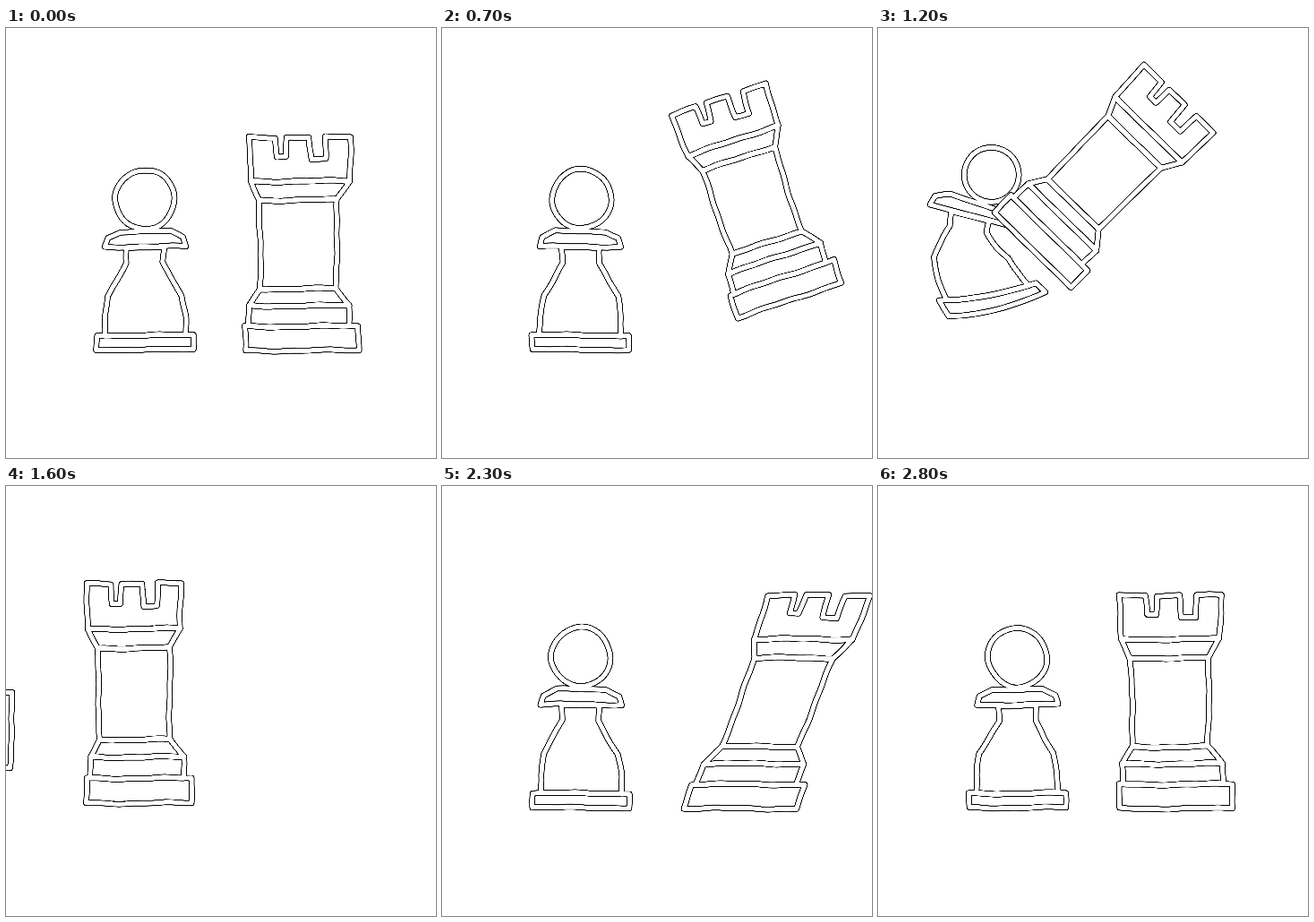
Recreate the animation shown at these times as an HTML page with a canvas. Size 480 by 480 pixels, loop 2.9 s.

```html
<!DOCTYPE html>
<html lang="en">
<head>
<meta charset="utf-8">
<title>Pawn and rook</title>
<style>
html, body { margin: 0; width: 100%; height: 100%; overflow: hidden; background: #fff; }
canvas { display: block; width: 480px; height: 480px; }
</style>
</head>
<body>
<canvas id="stage" width="480" height="480"></canvas>
<script>
const SIZE = 480, STEP = 100, COUNT = 29;
const ctx = document.getElementById('stage').getContext('2d', { willReadFrequently: true });

// Rook: origin at the middle of its foot, y points down.
const TOP = -238;
const notch = (left, right, depth) =>
  [[left, TOP], [left + 2, TOP + depth], [right - 1, TOP + depth], [right, TOP]];
const band = ([y0, l0, r0], [y1, l1, r1]) => [[l0, y0], [r0, y0], [r1, y1], [l1, y1]];
const rows = [[-189, -56, 54], [-168, -46, 41], [-69, -45, 39], [-50, -57, 55], [-27, -58, 54]];
const rookParts = [
  [[-58, TOP], ...notch(-29, -16, 21), ...notch(9, 28, 25), [56, TOP], [54, -189], [-56, -189]],
  ...rows.slice(1).map((row, i) => band(rows[i], row)),
  band([-27, -62, 64], [0, -62, 64])
];

// Pawn: mirrored halves, second value is the height above the foot.
const mirror = half => [...half, ...half.map(([x, h]) => [-x, h]).reverse()];
const pawnParts = [
  [[21, 114], [20.5, 97], [31, 77], [41.5, 60], [45, 36], [45.5, 16]],
  [[54, 0], [54, 16]],
  [[45, 115], [42, 125], [28, 132]]
].map(mirror);

// step, x, y, angle, skew, width, height
const rookDefaults = [0, 0, 0, 0, 0, .97, 1];
const rookKeys = [
  [0, 329, 360, 0, 0, 1],
  [3, 328, 336, -1, 0, .83, 1.02],
  [6, 350, 314, -11],
  [7, 387.5, 304, -19],
  [9, 412, 298, -25],
  [10, 380, 295, -10],
  [12, 172, 247, 44.5, 0, .95, .985],
  [13, 160, 260, 38],
  [16, 148, 354, 0, -.02, .93, 1.03],
  [18, 148, 356],
  [20, 150, 336, 0, -.29],
  [21, 215, 345, 0, -.1],
  [23, 331, 360, 0, .385, 1]
];

// step, x, y, angle, bend, scale
const pawnDefaults = [0, 0, 0, 0, 0, 1];
const pawnKeys = [
  [11, 155, 359],
  [12, 133, 308, 0, 1],
  [14, 62, 290, -45, .5, .88],
  [16, 6, 273, -88, 0, .78],
  [17, 155, 359]
];

function poseAt(keys, defaults, step) {
  const full = key => defaults.map((v, i) => key[i] ?? v);
  const next = keys.findIndex(k => k[0] >= step);
  if (next < 0) return full(keys[keys.length - 1]).slice(1);
  if (next === 0) return full(keys[0]).slice(1);
  const a = full(keys[next - 1]), b = full(keys[next]);
  const u = (step - a[0]) / (b[0] - a[0]);
  return a.map((v, i) => v + (b[i] - v) * u).slice(1);
}

function place(x, y, cx, cy, degrees) {
  const a = degrees * Math.PI / 180, c = Math.cos(a), s = Math.sin(a);
  return [cx + x * c - y * s, cy + x * s + y * c];
}

// Smooth hand wobble that redraws itself every step.
function wobble([x, y], step, size) {
  const seed = step * 2.4;
  return [
    x + size * (Math.sin(y * .06 + seed * 1.7) + .5 * Math.sin(y * .17 + x * .04 + seed)),
    y + size * (Math.sin(x * .055 + seed * 1.3) + .5 * Math.sin(x * .16 - y * .03 + seed * 2.1))
  ];
}

function outline(points, map) {
  const path = new Path2D();
  points.forEach(([x, y], i) => {
    const [nx, ny] = points[(i + 1) % points.length];
    const n = Math.max(1, Math.ceil(Math.hypot(nx - x, ny - y) / 8));
    for (let j = 0; j < n; j++) {
      path.lineTo(...map([x + (nx - x) * j / n, y + (ny - y) * j / n]));
    }
  });
  path.closePath();
  return path;
}

function strokeAll(paths, color, width) {
  ctx.strokeStyle = color;
  ctx.lineWidth = width;
  paths.forEach(p => ctx.stroke(p));
}

function drawPiece(paths) {
  ctx.fillStyle = '#fff';
  paths.forEach(p => ctx.fill(p));
  strokeAll(paths, '#000', 6.5);
  strokeAll(paths, '#fff', 5.1);
}

function pawn(step, size) {
  const [cx, cy, angle, bend, scale] = poseAt(pawnKeys, pawnDefaults, step);
  const warp = ([x, h]) => {
    const sag = 6 * (1 - (x / 55) ** 2) * Math.max(0, 1 - h / 60);
    const px = x + bend * (-.73 * h + .0041 * h * h);
    const py = -h * (1 - .14 * bend) + bend * (x * (-.25 + .0045 * h) + sag);
    return place(px * scale, py * scale, cx, cy, angle);
  };
  const map = p => warp(wobble(p, step, size));
  const [hx, hy] = warp([.5, 168]);
  const r = (33 - 2.5 * bend) * scale;
  const head = Array.from({ length: 40 }, (_, i) => {
    const a = i * Math.PI / 20;
    return [hx + r * Math.cos(a), hy + r * Math.sin(a)];
  });
  drawPiece([...pawnParts.map(p => outline(p, map)), outline(head, p => wobble(p, step, size))]);
}

function rook(step, size) {
  let [cx, cy, angle, skew, w, h] = poseAt(rookKeys, rookDefaults, step);
  const settle = step - 23;
  if (settle > 0) skew *= Math.exp(-.6 * settle) * Math.cos(.7 * settle);
  const map = p => {
    const [x, y] = wobble(p, step + 5, size);
    return place(x * w - skew * y, y * h, cx, cy, angle);
  };
  drawPiece(rookParts.map(p => outline(p, map)));
}

// Hardens the thin edges into a scratchy ink line.
function ink() {
  const image = ctx.getImageData(0, 0, SIZE, SIZE), d = image.data;
  for (let i = 0; i < d.length; i += 4) {
    d[i] = d[i + 1] = d[i + 2] = (d[i] - 120) * 3;
  }
  ctx.putImageData(image, 0, 0);
}

function draw(step) {
  ctx.fillStyle = '#fff';
  ctx.fillRect(0, 0, SIZE, SIZE);
  ctx.lineJoin = 'round';
  const size = step > 9 && step < 15 ? .15 : .8;
  if (step < 17 || step > 19) pawn(step, size);
  rook(step, size);
  ink();
}

let shown = -1;
function tick() {
  const step = Math.floor(performance.now() / STEP) % COUNT;
  if (step !== shown) draw(shown = step);
  requestAnimationFrame(tick);
}
tick();
</script>
</body>
</html>
```
